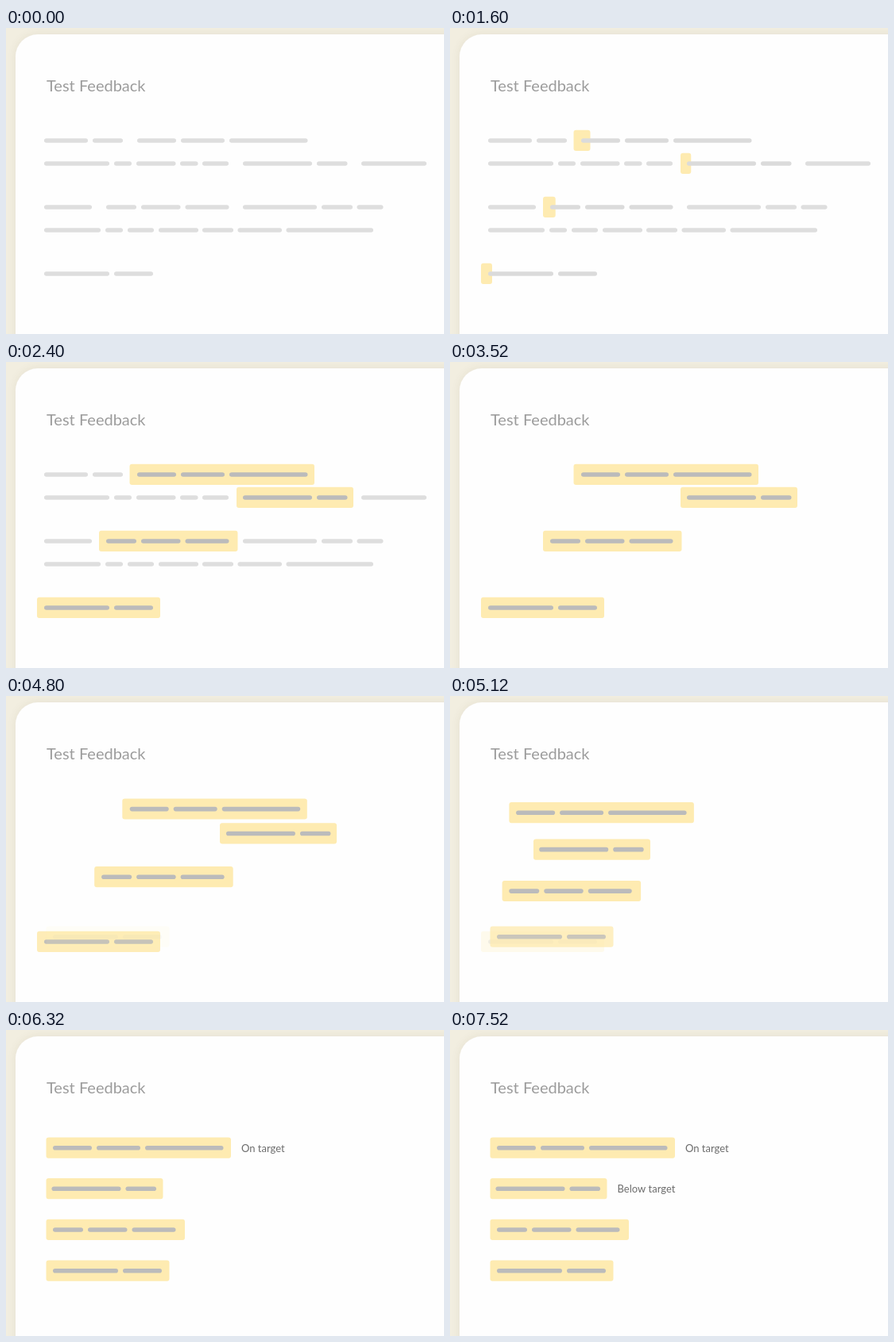
These frames come from a looping animation (551 by 386 pixels, 8000 ms). An HTML page with a canvas:

```html
<!DOCTYPE html>
<html lang="en">
<head>
<meta charset="utf-8">
<title>Test Feedback</title>
<style>
  html, body { margin: 0; width: 100%; height: 100%; overflow: hidden; background: #f2eee0; }
  canvas { display: block; }
</style>
</head>
<body>
<canvas id="stage" width="551" height="386"></canvas>
<script>
const ctx = document.getElementById('stage').getContext('2d');
const LOOP = 8000, STEP = 80;

// Unmarked words: line centre, then [left, right] of each word.
const plainLines = [
  { y: 142, words: [[48, 103], [109, 147]] },
  { y: 171, words: [[48, 130], [136, 158], [164, 213.5], [219, 241.5], [247, 280], [447, 529]] },
  { y: 226, words: [[48, 108], [298, 391], [397, 436], [441.5, 474.5]] },
  { y: 255, words: [[48, 119], [125, 147], [153, 186], [192, 242], [247, 286], [291.5, 347], [352.5, 462]] }
];

// Marked phrases: dx moves the marker box, wordDx the words inside it.
const phrases = [
  { x: 155.5, w: 232.5, y: 142, dx: -105, wordDx: -106, dy: 6.8, words: [[165, 214], [220, 275], [281, 379.5]] },
  { x: 290, w: 147, y: 171, dx: -239.5, wordDx: -240.5, dy: 29.3, words: [[298, 385], [391, 429.5]] },
  { x: 117, w: 174.5, y: 226, dx: -66.5, wordDx: -67, dy: 26, words: [[126, 164], [170, 219.5], [225.5, 280.5]] },
  { x: 39, w: 155, y: 310, dx: 11.5, wordDx: 11, dy: -6.2, dissolve: true, words: [[48, 130], [136, 185]] }
];

// cubic-bezier(0, 0, .58, 1), solved by bisection
function easeOut(x) {
  if (x <= 0) return 0;
  if (x >= 1) return 1;
  let lo = 0, hi = 1;
  for (let i = 0; i < 20; i++) {
    const s = (lo + hi) / 2;
    if (1.74 * (1 - s) * s * s + s * s * s < x) lo = s; else hi = s;
  }
  return 3 * lo * lo - 2 * lo * lo * lo;
}

const progress = (t, start, duration) => easeOut((t - start) / duration);

function roundRect(x, y, w, h, r, color) {
  ctx.fillStyle = color;
  ctx.beginPath();
  ctx.roundRect(x, y, w, h, r);
  ctx.fill();
}

function drawWords(words, y, color, dx = 0) {
  for (const [left, right] of words) {
    roundRect(left + dx, y - 2.8, right - left, 5.6, 2.8, color);
  }
}

function drawPhrase(phrase, marked, moved, alpha = 1) {
  const y = phrase.y + phrase.dy * moved;
  const gray = Math.round(222 - 35 * marked);
  ctx.globalAlpha = alpha;
  if (marked > 0) {
    roundRect(phrase.x + phrase.dx * moved, y - 13.2, phrase.w * marked, 26.2, 3, '#feebb1');
  }
  drawWords(phrase.words, y, `rgb(${gray},${gray},${gray})`, phrase.wordDx * moved);
  ctx.globalAlpha = 1;
}

function drawText(text, x, y, size, color, alpha = 1) {
  ctx.globalAlpha = alpha;
  ctx.font = `${size}px Lato, sans-serif`;
  ctx.fillStyle = color;
  ctx.fillText(text, x, y);
  ctx.globalAlpha = 1;
}

function drawCard() {
  ctx.fillStyle = '#f2eee0';
  ctx.fillRect(0, 0, 551, 386);
  ctx.shadowColor = 'rgba(90, 80, 40, .08)';
  ctx.shadowBlur = 12;
  roundRect(12, 8, 620, 460, 28, '#fefefe');
  ctx.shadowColor = 'transparent';
}

function draw(t) {
  const marked = progress(t, 1556, 800);
  const moved = progress(t, 4768, 600);

  drawCard();
  drawText('Test Feedback', 51, 79.5, 20, '#9c9c9c');

  if (t < 3360) plainLines.forEach(line => drawWords(line.words, line.y, '#dedede'));

  for (const phrase of phrases) {
    if (phrase.dissolve) {
      drawPhrase(phrase, marked, 0, 1 - moved);
      drawPhrase(phrase, marked, 1, moved);
    } else {
      drawPhrase(phrase, marked, moved);
    }
  }

  drawText('On target', 296, 153.5, 13, '#6c6c6c', progress(t, 6040, 300));
  drawText('Below target', 210.5, 205, 13, '#6c6c6c', progress(t, 7180, 300));
}

const begin = performance.now();
function tick() {
  const t = (performance.now() - begin) % LOOP;
  draw(Math.floor(t / STEP) * STEP);
  requestAnimationFrame(tick);
}
tick();
</script>
</body>
</html>
```
